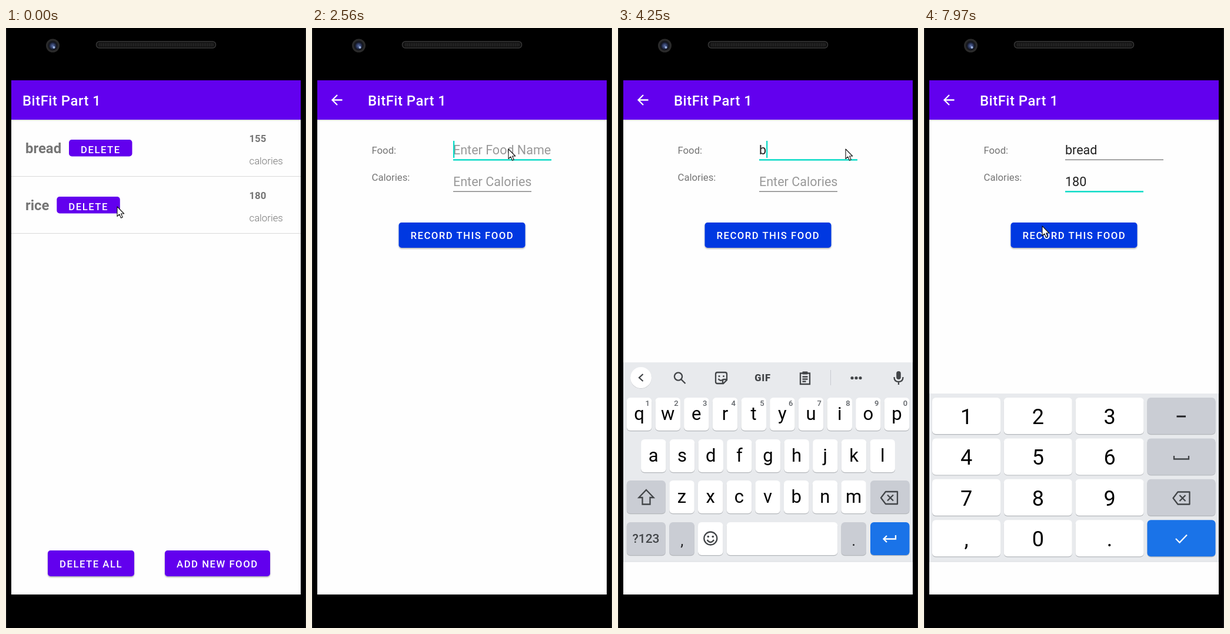
An HTML page that plays this animation: 510x1021 px, repeating every 8000 ms.

```html
<!DOCTYPE html>
<html lang="en">
<head>
<meta charset="utf-8">
<title>Food log</title>
<style>
  html, body { margin: 0; width: 100%; height: 100%; overflow: hidden; background: #000; }
  svg { display: block; width: 100%; height: 100%; font-family: Roboto, sans-serif; }
  text { white-space: pre; }
  .line { fill: none; stroke: #424548; stroke-width: 2.3; }
  .white { stroke: #fff; }
</style>
</head>
<body>
<script>
const LOOP = 8000;
const PURPLE = '#6200ee', TEAL = '#03dac5', GRAY = '#757575', PAGE = '#fefefe';

// Drawing helpers
const rect = (x, y, w, h, fill, r = 0, more = '') =>
  `<rect x="${x}" y="${y}" width="${w}" height="${h}" rx="${r}" fill="${fill}" ${more}/>`;
const text = (x, y, s, size, fill = '#000', more = '') =>
  `<text x="${x}" y="${y}" font-size="${size}" fill="${fill}" ${more}>${s}</text>`;
const circle = (x, y, r, fill, more = '') => `<circle cx="${x}" cy="${y}" r="${r}" fill="${fill}" ${more}/>`;
const line = (d, more = '') => `<path class="line" d="${d}" ${more}/>`;
const group = (id, body, more = '') => `<g id="${id}" ${more}>${body}</g>`;
const MID = 'text-anchor="middle"', BOLD = 'font-weight="700"', MEDIUM = 'font-weight="500"';

const caps = (x, y, s) => text(x, y, s, 16.74, '#fff', MEDIUM + ' letter-spacing="1.495"');
const raised = (x, y, w, h, fill) => rect(x, y, w, h, fill, 4.8, 'filter="url(#lift)"');
const appBar = titleX =>
  rect(9, 89, 492, 67, PURPLE, 0, 'filter="url(#barShade)"') +
  text(titleX, 132, 'BitFit Part 1', 23.9, '#fff', MEDIUM + ' letter-spacing=".5"');

// Phone body
function phone() {
  return rect(0, 0, 510, 1021, '#000') +
    rect(0, 0, 1.5, 1021, '#171717') + rect(508.5, 0, 1.5, 1021, '#171717') +
    circle(79.5, 30, 11.5, '#2b2b2b') + circle(79.5, 30, 8.5, '#17191f') +
    circle(79.5, 30.5, 6, 'url(#lens)') + circle(81.5, 33, 2, '#9fb4dd') +
    rect(153.5, 23, 203, 11, '#111', 5, 'stroke="#383838" stroke-width="1.4"') +
    rect(157, 25.5, 196, 6, 'url(#mesh)', 2);
}

// Food list
function foodRow(y, name, deleteX, kcal) {
  return text(33, y + 57, name, 23.9, GRAY, BOLD) +
    rect(deleteX, y + 34, 107.5, 28.5, PURPLE, 4.8) +
    caps(deleteX + 20, y + 57, 'DELETE') +
    text(413.5, y + 38, kcal, 16.74, GRAY, BOLD) +
    text(413.5, y + 76, 'calories', 16.74, GRAY, 'font-weight="300"') +
    rect(9, y + 96, 492, 1.1, '#dcdcdc');
}
function home() {
  return rect(9, 89, 492, 875, PAGE) + foodRow(156, 'bread', 107, 155) + foodRow(253, 'rice', 86.3, 180) +
    appBar(28) +
    raised(71, 889, 147, 44, PURPLE) + caps(91, 917.5, 'DELETE ALL') +
    raised(270, 889, 179, 44, PURPLE) +
    circle(354, 901, 0, '#fff', 'id="ripple" opacity=".24" clip-path="url(#addButton)"') +
    caps(290, 917.5, 'ADD NEW FOOD');
}

// Entry form
const field = (id, y, w) =>
  text(240, y, '', 21.53, '#999', `id="${id}Text"`) +
  rect(240, y + 8.6, w, 1.3, GRAY, 0, `id="${id}Line"`);
function form() {
  return rect(9, 89, 492, 875, PAGE) + appBar(95) +
    line('M51.5 122.5H34.5M43 114l-8.5 8.5 8.5 8.5', 'style="stroke:#fff"') +
    text(101.5, 214, 'Food:', 16.74, GRAY) + text(101.5, 260, 'Calories:', 16.74, GRAY) +
    field('food', 215, 167) + field('kcal', 269, 133) +
    rect(240, 192, 2.2, 29, TEAL, 0, 'id="caret"') +
    raised(147.5, 331, 215, 43, '#0038e1') + caps(167.5, 358.8, 'RECORD THIS FOOD');
}

// Keyboards
const key = (x, y, w, h, fill) => rect(x, y + 1.2, w, h, '#b4b7bb', 6) + rect(x, y, w, h, fill, 6);
const SIDE = '#cacdd4', BLUE = '#1a73e8';
const erase = (x, y) =>
  line(`M${x - 6} ${y - 10.5}H${x + 14}V${y + 10.5}H${x - 6}L${x - 14} ${y}ZM${x - 3} ${y - 5}l10 10m0 -10l-10 10`,
    'stroke-linejoin="round"');
const panel = top => rect(9, top, 492, 908 - top, '#e8eaed') +
  rect(9, 908, 492, 56, PAGE) + rect(9, 907.5, 492, 1, '#dadce0');

function letterRow(chars, x, y, hints) {
  return [...chars].map((c, i) => {
    const left = x + i * 48.67;
    return key(left, y, 42.5, 56, '#fff') + text(left + 21.2, y + 38, c, 31, '#000', MID) +
      (hints ? text(left + 35.5, y + 14, (i + 1) % 10, 13, '#5f6368', MID + ' ' + MEDIUM) : '');
  }).join('');
}
function toolbar() {
  return line('M42.5 589l-6.5 6 6.5 6') +
    circle(102.5, 593, 6.6, 'none', 'class="line"') + line('M107 597.5l7.5 7.5') +
    line('M169 586h13q3 0 3 3v10l-6 6h-10q-3 0 -3 -3v-13q0 -3 3 -3zM185 598h-5q-2 0 -2 2v5M170.5 597q4 5 8 1', 'stroke-width="2"') +
    circle(172, 592.5, 1.5, '#424548') + circle(179.5, 592.5, 1.5, '#424548') +
    text(246, 601, 'GIF', 16.5, '#424548', MID + ' font-weight="900" letter-spacing=".8"') +
    line('M310 587.5h16v18.5h-16zM313.5 593.5h9M313.5 597.5h9M313.5 601.5h6') +
    rect(313.5, 584.5, 9, 5, '#424548', 1) +
    rect(361, 582, 1, 26, '#c8cbd0') +
    [398, 405, 412].map(x => circle(x, 595.5, 2.6, '#424548')).join('');
}
function letters() {
  return panel(569) + circle(39, 595.7, 18, '#bfc2c6') + circle(39, 595, 18, '#fff') +
    group('tools', toolbar()) +
    group('words', line('M36 589l6.5 6 -6.5 6') + rect(193, 584, 1, 23, '#c8cbd0') + rect(323, 584, 1, 23, '#c8cbd0') +
      [128, 258, 389].map(x => text(x, 601, '', 18, '#202124', MID + ' class="word"')).join('')) +
    rect(473.2, 584, 7.6, 14, '#424548', 3.8) + line('M469.5 594q0 8 7.5 8t7.5 -8M477 602v5') +
    letterRow('qwertyuiop', 14.8, 629, true) + letterRow('asdfghjkl', 39.1, 700) +
    letterRow('zxcvbnm', 87.3, 770) +
    key(14.8, 770, 66, 56, SIDE) + line('M48 786l12.5 13H54.5v11.5h-13V799H35.500z') +
    key(429, 770, 66.5, 56, SIDE) + erase(461, 799.5) +
    key(14.8, 841, 66, 56, SIDE) + text(47.5, 876, '?123', 21, '#424548', MID + ' ' + MEDIUM) +
    key(87.3, 841, 42.5, 56, SIDE) + text(108.700, 881, ',', 26, '#202124', MID) +
    key(136, 841, 42.5, 56, '#fff') + circle(157.3, 868.5, 11, 'none', 'class="line"') +
    circle(153.3, 865.5, 1.8, '#424548') + circle(161.3, 865.5, 1.8, '#424548') + line('M151.5 871q5.800 8 11.6 0') +
    key(184.8, 841, 188.5, 56, '#fff') +
    key(379.500, 841, 42.5, 56, SIDE) + text(400.8, 881, '.', 26, '#202124', MID) +
    key(429, 841, 66.5, 56, BLUE) + line('M472 863v6.500h-20M457 864l-5.500 5.500 5.500 5.500', 'style="stroke:#fff"');
}
function digits() {
  const rows = ['123', '456', '789', ',0.'];
  return panel(622) + rows.map((chars, r) => {
    const y = 629 + r * 69.4;
    return [...chars].map((c, i) => {
      const x = 14 + i * 121.8;
      return key(x, y, 116, 62, '#fff') + text(x + 58, y + 45, c, 36, '#000', MID);
    }).join('') + key(379.5, y, 116, 62, r === 3 ? BLUE : SIDE);
  }).join('') +
    line('M429.500 661h15.500', 'style="stroke:#202124;stroke-width:3"') +
    line('M425 728v5.500h25V728') + erase(437.500, 800) +
    line('M428 869l6.500 6.500 12.500 -13', 'style="stroke:#fff"');
}

document.body.innerHTML = `<svg viewBox="0 0 510 1021">
<defs>
  <clipPath id="screen"><rect x="9" y="89" width="492" height="875"/></clipPath>
  <clipPath id="addButton"><rect x="270" y="889" width="179" height="44" rx="4.8"/></clipPath>
  <radialGradient id="lens"><stop offset="0" stop-color="#5a6fa8"/><stop offset="1" stop-color="#151b33"/></radialGradient>
  <pattern id="mesh" width="3" height="3" patternUnits="userSpaceOnUse"><rect width="1.5" height="3" fill="#2c2c2c"/></pattern>
  <filter id="lift" x="-10%" y="-20%" width="120%" height="150%"><feDropShadow dx="0" dy="1.6" stdDeviation="1.2" flood-opacity=".32"/></filter>
  <filter id="barShade" x="0" y="0" width="100%" height="115%"><feDropShadow dx="0" dy="1" stdDeviation="1" flood-opacity=".2"/></filter>
</defs>
${phone()}
<g clip-path="url(#screen)">
  ${group('home', home())}
  ${rect(9, 89, 492, 875, '#000', 0, 'id="dim" opacity=".065"')}
  ${group('form', form())}
  ${group('letters', letters())}
  ${group('digits', digits())}
</g>
<path id="pointer" d="M0 0V16.500L3.800 13 6.500 19.200 9.200 18 6.600 12H11.700Z" fill="#fff" stroke="#111" stroke-width="1.1" stroke-linejoin="round"/>
</svg>`;

// Timelines: [start ms, ...values], each value holds until the next step
const POINTER = [[0, 189, 304], [120, 172, 275], [250, 125, 232], [380, 100, 216], [520, 128, 300], [650, 195, 480],
  [780, 275, 700], [920, 335, 850], [1050, 354, 901], [1460, 354, 870], [1600, 356, 745], [1740, 357, 591],
  [1880, 350, 430], [2020, 341, 300], [2170, 335, 225], [2290, 334, 206], [2710, 365, 206], [2860, 387, 206],
  [5330, 380, 212], [5460, 350, 228], [5600, 312, 247], [5730, 286, 258], [7670, 272, 268], [7820, 234, 302], [7970, 201, 337]];
const RIPPLE = [[0, 0], [1170, 45], [1310, 110], [1460, 180], [1600, 0]];
const OPENING = [[0, -1], [1740, .79], [1880, .965], [2020, .995], [2170, 1]];
const FOCUS = [[0, ''], [2430, 'food'], [5860, 'kcal']];
const FOOD = [[0, ''], [4250, 'b'], [4520, 'br'], [4800, 'bre'], [4930, 'brea'], [5070, 'bread']];
const KCAL = [[0, ''], [6810, '1'], [6930, '18'], [7240, '180']];
const CARET = [[0, 0], [2430, 1], [3010, 0], [3540, 1], [3970, 0], [4250, 1], [5600, 0], [5860, 1],
  [6410, 0], [6810, 1], [7820, 0]];
const SLIDE = [[0, 400], [2710, 150], [2860, 0]];
const WORDS = [[0, ''], [4400, 'but by be'], [4520, 'bro bring break'], [4800, 'bread break breakfast'],
  [4930, 'break bread breaks'], [5070, 'breads bread breadth']];

const el = id => document.getElementById(id);
const at = (steps, t) => steps.findLast(s => s[0] <= t).slice(1);
const show = (id, on) => el(id).setAttribute('visibility', on ? 'inherit' : 'hidden');
const scale = (id, k) =>
  el(id).setAttribute('transform', `translate(255 526.5) scale(${k}) translate(-255 -526.5)`);

function setField(id, value, hint, y, focused) {
  const label = el(id + 'Text'), rule = el(id + 'Line');
  label.textContent = value || hint;
  label.setAttribute('fill', value ? '#202020' : '#999');
  rule.setAttribute('fill', focused ? TEAL : GRAY);
  rule.setAttribute('y', focused ? y + 8.2 : y + 8.6);
  rule.setAttribute('height', focused ? 2.4 : 1.3);
  if (focused) {
    el('caret').setAttribute('x', 240 + (value ? label.getComputedTextLength() : 0));
    el('caret').setAttribute('y', y - 23);
  }
}

function render(t) {
  const [x, y] = at(POINTER, t), [open] = at(OPENING, t), [focus] = at(FOCUS, t), [words] = at(WORDS, t);
  el('pointer').setAttribute('transform', `translate(${x} ${y})`);
  el('ripple').setAttribute('r', at(RIPPLE, t)[0]);

  show('home', open < 1);
  show('dim', open > 0 && open < 1);
  show('form', open > 0);
  scale('home', 1 + .0505 * Math.max(open, 0));
  scale('form', .85 + .15 * open);

  setField('food', at(FOOD, t)[0], 'Enter Food Name', 215, focus === 'food');
  setField('kcal', at(KCAL, t)[0], 'Enter Calories', 269, focus === 'kcal');
  show('caret', open > 0 && at(CARET, t)[0]);

  show('letters', t >= 2710 && t < 5860);
  show('digits', t >= 5860);
  el('letters').setAttribute('transform', `translate(0 ${at(SLIDE, t)[0]})`);
  show('tools', !words);
  show('words', words);
  const list = words.split(' ');
  document.querySelectorAll('.word').forEach((w, i) => { w.textContent = list[i] || ''; });
}

const start = performance.now();
function tick() {
  render((performance.now() - start) % LOOP);
  requestAnimationFrame(tick);
}
tick();
</script>
</body>
</html>
```
